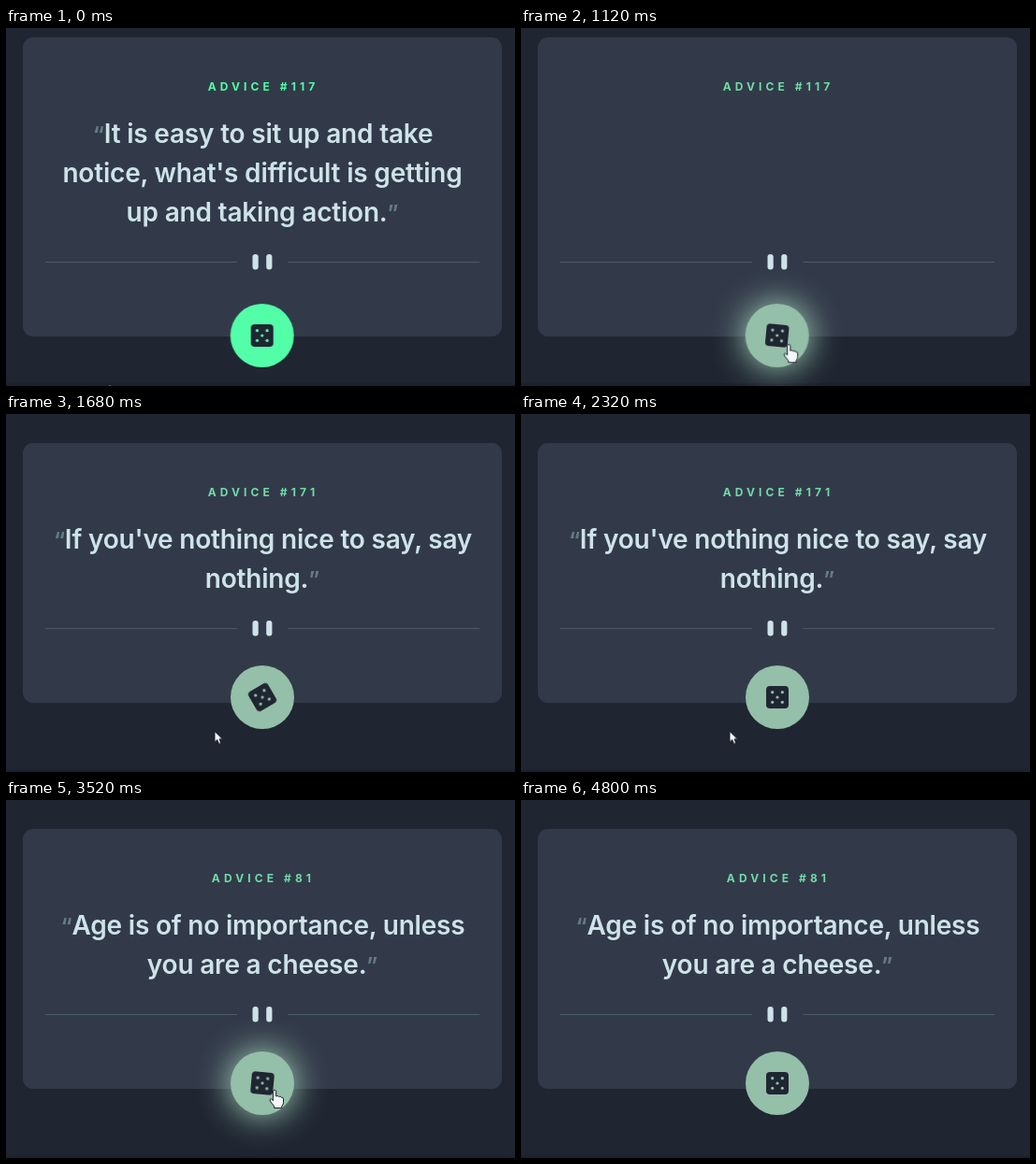
Write an HTML page that moves like this. It is 544 px wide and 383 px high and loops after 4880 ms.

```html
<!DOCTYPE html>
<html lang="en">
<head>
<meta charset="utf-8">
<title>Advice generator</title>
<style>
  html, body { margin: 0; width: 100%; height: 100%; overflow: hidden; background: #1f2632; }
  svg { display: block; width: 100vw; height: 100vh; }
  svg * { animation: 4.88s linear infinite; }
  text { text-anchor: middle; font-family: Inter, "Open Sans", sans-serif; }

  /* Card: three lines of advice, then two */
  .card { fill: #323a49; animation-name: card; animation-timing-function: step-end; }
  .head { animation-name: head; animation-timing-function: step-end; }
  .divider { fill: #cee3e9; animation-name: divider; animation-timing-function: step-end; }
  .rule { fill: #4a5b69; }
  @keyframes card {
    0% { y: 10px; height: 320px; }
    26.02%, 100% { y: 31px; height: 278px; }
  }
  @keyframes head {
    0% { transform: translateY(0); fill: #52ffa8; }
    9.84% { transform: translateY(0); fill: #72dba6; }
    26.02%, 100% { transform: translateY(21px); fill: #72dba6; }
  }
  @keyframes divider {
    0% { transform: translateY(250px); }
    26.02%, 100% { transform: translateY(229px); }
  }

  .title { font-size: 12px; font-weight: 700; letter-spacing: 4.1px; animation-timing-function: step-end; }
  .t1 { animation-name: t1; }
  .t2 { animation-name: t2; }
  .t3 { animation-name: t3; }
  @keyframes t1 { 0% { opacity: 1; } 26.02%, 100% { opacity: 0; } }
  @keyframes t2 { 0% { opacity: 0; } 26.02% { opacity: 1; } 67%, 100% { opacity: 0; } }
  @keyframes t3 { 0% { opacity: 0; } 67%, 100% { opacity: 1; } }

  .quote { fill: #cee3e9; font-size: 28px; font-weight: 600; letter-spacing: -.2px; }
  .mark { fill: #667b84; font-size: 24px; }
  .q1 { animation-name: q1; }
  .q2 { animation-name: q2; }
  .q3 { animation-name: q3; }
  @keyframes q1 {
    0%, 13.11% { opacity: 1; animation-timing-function: ease-in; }
    19.26%, 100% { opacity: 0; }
  }
  @keyframes q2 {
    0%, 26.23% { opacity: 0; animation-timing-function: ease; }
    31.15% { opacity: 1; }
    62.3% { opacity: 1; animation-timing-function: ease-in; }
    67.21%, 100% { opacity: 0; }
  }
  @keyframes q3 {
    0%, 67.21% { opacity: 0; animation-timing-function: ease; }
    72%, 100% { opacity: 1; }
  }

  /* Dice button */
  .button { animation-name: button; animation-timing-function: step-end; }
  .face { fill: currentColor; }
  .glow { fill: #b0dfc5; filter: blur(18px); animation-name: glow; }
  .dice { animation-name: spin; }
  @keyframes button {
    0% { transform: translate(273.7px, 329px); color: #52ffa8; }
    9.84% { transform: translate(273.7px, 329px); color: #94bfa8; }
    26.02%, 100% { transform: translate(274px, 303px); color: #94bfa8; }
  }
  @keyframes glow {
    0%, 9.84% { opacity: 0; }
    12.7%, 24.39% { opacity: 1; }
    28.69%, 56.56% { opacity: 0; }
    60.66%, 77.05% { opacity: 1; }
    81.15%, 100% { opacity: 0; }
  }
  @keyframes spin {
    0%, 13.11% { transform: rotate(0deg); animation-timing-function: ease; }
    45.9% { transform: rotate(360deg); }
    62.3% { transform: rotate(360deg); animation-timing-function: ease; }
    95.08%, 100% { transform: rotate(720deg); }
  }

  /* Pointer */
  .pointer { animation-name: move; }
  .arrow, .hand, .busy { animation-timing-function: step-end; }
  .arrow, .hand { fill: #f4f7f8; stroke: #1a202b; stroke-linejoin: round; }
  .arrow { animation-name: arrow; }
  .hand { animation-name: hand; }
  .busy { fill: #1f3446; stroke: #7cc4ea; stroke-width: 3.4; animation-name: busy; }
  @keyframes move {
    0%, 1.64% { transform: translate(110.5px, 381px); }
    7% { transform: translate(215px, 367px); animation-timing-function: ease-out; }
    11.48%, 22.5% { transform: translate(290px, 338px); }
    26.23% { transform: translate(260px, 340px); animation-timing-function: ease-out; }
    29.51% { transform: translate(223px, 339.5px); }
    50.82% { transform: translate(223px, 339.5px); animation-timing-function: ease-in-out; }
    59.8% { transform: translate(287px, 310px); }
    74.6% { transform: translate(287px, 310px); animation-timing-function: ease-in; }
    80% { transform: translate(270px, 348px); }
    87%, 100% { transform: translate(235px, 387px); }
  }
  @keyframes arrow {
    0% { opacity: 1; } 9.84% { opacity: 0; }
    27.87% { opacity: 1; } 56.56% { opacity: 0; }
    77.05%, 100% { opacity: 1; }
  }
  @keyframes hand {
    0% { opacity: 0; } 9.84% { opacity: 1; }
    25.4% { opacity: 0; } 56.56% { opacity: 1; }
    77.05%, 100% { opacity: 0; }
  }
  @keyframes busy {
    0% { opacity: 0; } 25.4% { opacity: 1; } 27.87%, 100% { opacity: 0; }
  }
</style>
</head>
<body>
<svg viewBox="0 0 544 383">
  <rect y="380" width="544" height="3" fill="#1b212d"/>
  <rect class="card" x="18" y="10" width="512" height="320" rx="11"/>

  <g class="head">
    <text class="title t1" x="275" y="67">ADVICE #117</text>
    <text class="title t2" x="275" y="67">ADVICE #171</text>
    <text class="title t3" x="275" y="67">ADVICE #81</text>
  </g>

  <g class="quote q1">
    <text x="274.5" y="123"><tspan class="mark">“</tspan>It is easy to sit up and take</text>
    <text x="274" y="165">notice, what's difficult is getting</text>
    <text x="274" y="207">up and taking action.<tspan class="mark">”</tspan></text>
  </g>
  <g class="quote q2">
    <text x="274.5" y="144"><tspan class="mark">“</tspan>If you've nothing nice to say, say</text>
    <text x="274" y="186">nothing.<tspan class="mark">”</tspan></text>
  </g>
  <g class="quote q3">
    <text x="274.5" y="144"><tspan class="mark">“</tspan>Age is of no importance, unless</text>
    <text x="274" y="186">you are a cheese.<tspan class="mark">”</tspan></text>
  </g>

  <g class="divider">
    <rect class="rule" x="42" width="205" height="1"/>
    <rect class="rule" x="301.5" width="204.5" height="1"/>
    <rect x="263.5" y="-8" width="6.2" height="16.5" rx="3"/>
    <rect x="278.2" y="-8" width="6.2" height="16.5" rx="3"/>
  </g>

  <g class="button">
    <circle class="glow" r="34"/>
    <circle class="face" r="34"/>
    <g class="dice">
      <rect x="-12" y="-12" width="24" height="24" rx="4" fill="#1f2632"/>
      <g class="face">
        <circle r="1.6"/>
        <circle cx="-5.3" cy="-5.3" r="1.6"/>
        <circle cx="5.3" cy="-5.3" r="1.6"/>
        <circle cx="-5.3" cy="5.3" r="1.6"/>
        <circle cx="5.3" cy="5.3" r="1.6"/>
      </g>
    </g>
  </g>

  <g class="pointer">
    <path class="arrow" d="M0 0V11.5L2.7 9 4.6 13.4 6.8 12.4 5 8.2H8.6Z"/>
    <path class="hand" d="M-1.6 1.2Q0 -1 1.7 1.2V7Q3.4 5.8 4.6 7.4 6.3 6.4 7.3 8.2 9.4 7.6 9.5 10V13.5Q9.3 16 7.8 17.5V19.5H-.4V17.8L-4.8 12Q-5.4 9.6 -3.4 9.8L-1.6 11.6Z"/>
    <circle class="busy" r="6"/>
  </g>
</svg>
</body>
</html>
```
